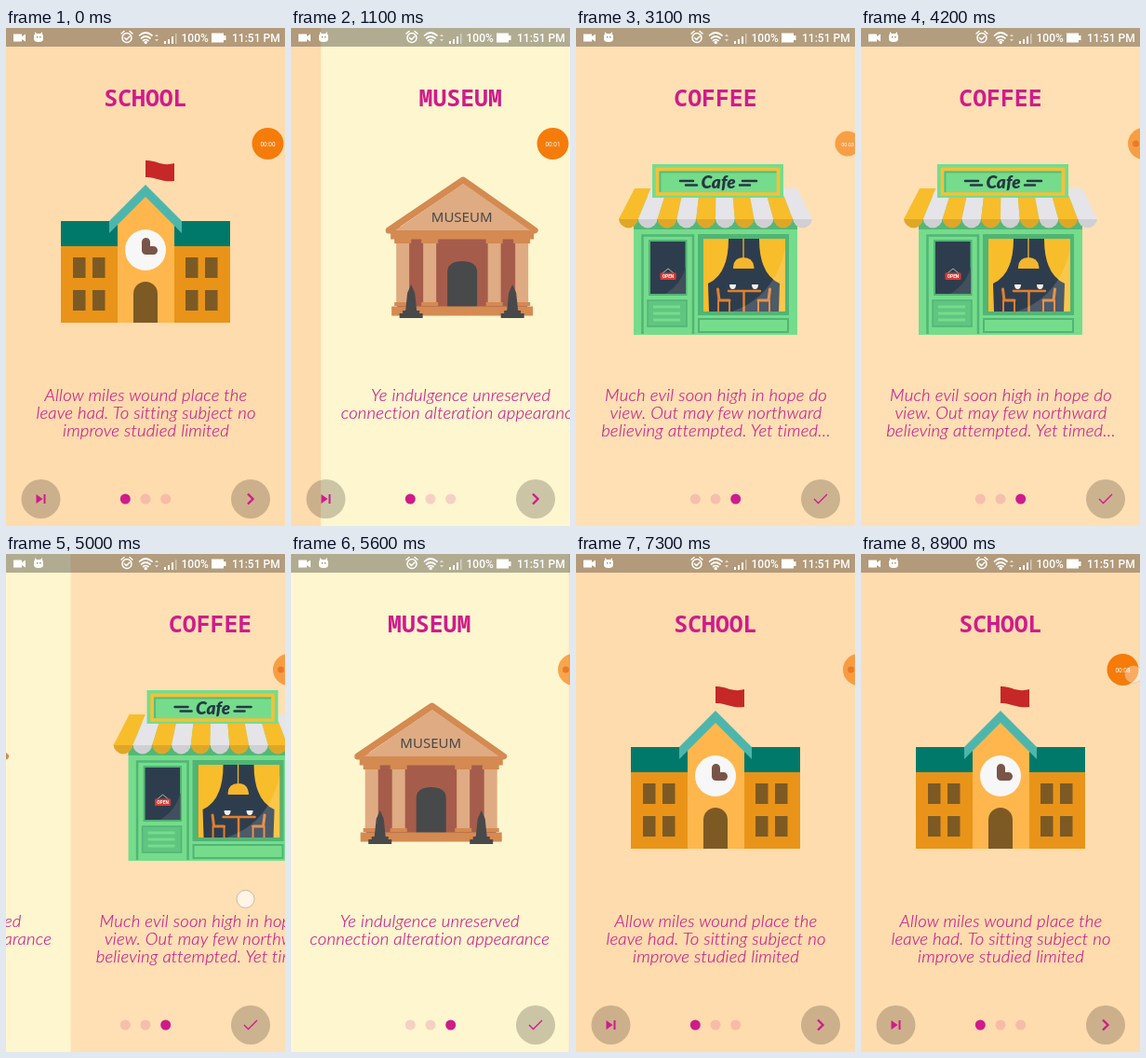
Animation of 300 by 534 pixels, one loop 9 s. Source, as an HTML page:

```html
<!DOCTYPE html>
<html lang="en">
<head>
<meta charset="utf-8">
<title>Onboarding pages</title>
<style>
  html, body { margin: 0; width: 100%; height: 100%; overflow: hidden; background: #ffdcae; }
  svg { display: block; width: 100vw; height: 100vh; }
  text { text-anchor: middle; }
  .title { font: 600 24.8px "Noto Sans Mono", monospace; fill: #cf1c8b; }
  .body { font: italic 300 18.5px Lato, sans-serif; letter-spacing: .2px; fill: #c9178a; stroke: #c9178a; stroke-width: .15px; }
  .status text { font: 500 12px Roboto, sans-serif; text-anchor: start; }
  .line { fill: none; stroke-linecap: round; stroke-linejoin: round; }
</style>
</head>
<body>
<svg viewBox="0 0 300 534">
  <defs>
    <g id="windowPair" fill="#7d5a24">
      <path d="M0 0h13.5v22H0zM21 0h13.5v22H21zM0 35h13.5v22H0zM21 35h13.5v22H21z"/>
    </g>
    <g id="column">
      <path fill="#dfab82" d="M-7 230H7V297H-7z"/>
      <path fill="#d48a51" d="M-9 226H9v5H-9zM-9 294H9v4H-9z"/>
    </g>
    <path id="obelisk" fill="#48494b" d="M0 275L4 284L6 303H9V306H12.5V311H-12.5V306H-9V303H-6L-4 284Z"/>
    <g id="chair" class="line" stroke="#e0802f" stroke-width="2">
      <path d="M-4 292V304M8 293V304"/>
      <path d="M-4.500 280L-3 292H8" stroke-width="3"/>
    </g>
  </defs>

  <g class="page">
    <rect width="301" height="534" fill="#ffdcae"/>
    <path fill="#c62828" d="M150 142C160 141 168 149 181 145V164C168 166 160 159 150 160Z"/>
    <path fill="#e99419" d="M59 233H241V316H59z"/>
    <path fill="#00796b" d="M59 207H241V234H59z"/>
    <path fill="#ffb74d" d="M120 208L150 176L181 208V316H120z"/>
    <path fill="#4db6ac" d="M150 168L189 207V220L150 181L111 220V207Z"/>
    <circle cx="150" cy="238" r="22" fill="#f7f7f8"/>
    <path class="line" stroke="#795548" stroke-width="9" d="M150.500 229.500V238.500H158.500"/>
    <use href="#windowPair" x="72" y="246"/>
    <use href="#windowPair" x="193" y="246"/>
    <path fill="#7d5a24" d="M137 316V285a13 13 0 0 1 26 0V316Z"/>
  </g>

  <g class="page">
    <rect width="301" height="534" fill="#fdf6cf"/>
    <path fill="#a65c4b" d="M82 226H222V299H82z"/>
    <path fill="#48494b" d="M136 299V262Q136 250 152 250T168 262V299Z"/>
    <path fill="#d48a51" d="M75 218H229V226.500H75zM76 298.500H228V308.500H76z"/>
    <use href="#column" x="88"/>
    <use href="#column" x="117"/>
    <use href="#column" x="186.500"/>
    <use href="#column" x="216"/>
    <path class="line" stroke="#d48a51" stroke-width="7" d="M73 217L153 163L230 217Z"/>
    <path fill="#dfab82" d="M80 217L153 167L225 217Z"/>
    <text x="151.500" y="208" fill="#48494b" style="font:15px 'Noto Sans',sans-serif">MUSEUM</text>
    <use href="#obelisk" x="97"/>
    <use href="#obelisk" x="206"/>
  </g>

  <g class="page">
    <rect width="301" height="534" fill="#fee0b4"/>
    <path fill="#75dc8c" d="M62 180H238V329H62z"/>
    <path fill="#53b875" d="M62 205H238V216H62z"/>
    <g id="awning"></g>
    <path fill="#75dc8c" d="M82 146H223V182H82z"/>
    <path fill="#75dc8c" stroke="#f5c137" stroke-width="3.500" d="M87.500 151.500H217.500V178H87.500z"/>
    <path fill="none" stroke="#58bd79" stroke-width="2" d="M90.500 176V154.500H215.500"/>
    <text x="153" y="172" fill="#263844" style="font:italic 900 19px Lato,sans-serif">Cafe</text>
    <path class="line" stroke="#263844" stroke-width="2.500" d="M112 164H126M118 168.500H130M179 164H194M176 168.500H187"/>

    <path fill="none" stroke="#50b575" stroke-width="2.500" d="M71.500 328V222.500H126V328"/>
    <path fill="#2e3d4d" stroke="#50b575" stroke-width="2" d="M79 228H118.500V286H79z"/>
    <path fill="#42505d" d="M118 256V285H96Q113 275 118 256Z"/>
    <path class="line" stroke="#e6e6e6" stroke-width=".7" d="M93 263L99 258L105 263"/>
    <rect x="90.500" y="262.500" width="17" height="7.500" rx="1" fill="#d93b35"/>
    <text x="99" y="268" fill="#fff" style="font:700 4.800px Roboto,sans-serif">OPEN</text>
    <path fill="#5fc580" stroke="#50b575" stroke-width="1.500" d="M77 292H119V320H77z"/>
    <path stroke="#75dc8c" stroke-width="3" d="M83 299H112M83 306H112M83 313H112"/>

    <path fill="#50b575" d="M131 221H229V308H131z"/>
    <path fill="#2e3d4d" d="M137 226H225V304H137z"/>
    <path fill="#f8bd2b" d="M137 226H164Q164 264 142 274L143 304H137ZM225 226H197Q197 264 219 274L218 304H225Z"/>
    <path class="line" stroke="#f5b62d" stroke-width="1.300" d="M180 226V247"/>
    <path fill="#f5b62d" d="M169 258Q169 246 180 246T191.500 258Z"/>
    <use href="#chair" x="157"/>
    <use href="#chair" transform="translate(204 0) scale(-1 1)"/>
    <path class="line" stroke="#e0802f" stroke-width="2.500" d="M164 282H198M180.500 282V304"/>
    <path fill="#f2f2f2" d="M165 275h7q0 5-3.500 5t-3.500-5zM189 275h7q0 5-3.500 5t-3.500-5z"/>
    <path fill="#fff" opacity=".15" d="M225 236V304H168Q214 288 225 236Z"/>
    <path fill="none" stroke="#50b575" stroke-width="2" d="M132 312H228V326H132z"/>
  </g>

  <g id="skip">
    <circle cx="37.500" cy="505" r="21" opacity=".2"/>
    <path fill="#cf1c8b" d="M32.500 500L39.500 505L32.500 510ZM40.500 500H42.500V510H40.500Z"/>
  </g>
  <circle cx="263" cy="505" r="21" opacity=".2"/>
  <path id="next" fill="none" stroke="#cf1c8b"/>
  <g id="dots" fill="#cf1c8b">
    <circle cx="128.300" cy="505" r="5.500"/>
    <circle cx="150" cy="505" r="5.500"/>
    <circle cx="171.700" cy="505" r="5.500"/>
  </g>

  <circle id="bubbleDisc" cy="124" fill="#f57c0a"/>
  <text id="timer" y="126.500" fill="#fff"></text>
  <circle id="bubbleDot" cx="295.500" cy="124" r="3.500" fill="#ec7a24"/>

  <g class="status" fill="#fff">
    <rect width="300" height="20" fill="#000" opacity=".3"/>
    <path d="M8 6.500H17V9L21 6.500V14.500L17 12V14.500H8z"/>
    <path d="M31 4L33 6H37L39 4V6.500Q40 7 40 9V12Q40 15 35 15T30 12V9Q30 7 31 6.500Z"/>
    <path d="M33 9h1.500v1.500H33zM36 9h1.500v1.500H36z" fill="#a9936f"/>
    <g class="line" stroke="#fff" stroke-width="1.500">
      <circle cx="130" cy="10.500" r="5"/>
      <path d="M124 6L127 3.500M136 6L133 3.500M127.500 10.500L129.500 12.500L133 9"/>
      <path d="M143.500 8Q150 2 157 8M145.500 11Q150 7 155 11M147.500 13.500Q150 11.500 153 13.500" stroke-width="1.700"/>
    </g>
    <circle cx="150.200" cy="15.500" r="1.700"/>
    <path d="M160 9L162 6.500L164 9ZM160 12L162 14.500L164 12Z" opacity=".65"/>
    <path d="M170 14h2v3h-2zM174 12h2v5h-2zM178 9h2v8h-2z"/>
    <path d="M182 6h1.500v11H182z" opacity=".45"/>
    <text x="188.500" y="15">100%</text>
    <path d="M221 5.500H234V8H236.500V13H234V15.500H221z"/>
    <text x="243" y="15">11:51 PM</text>
  </g>
  <circle id="touch" r="9.500" fill="#fff" fill-opacity=".65" stroke="#a89a88" stroke-opacity=".6"/>
</svg>

<script>
const LOOP = 9000, WIDTH = 300;
const byId = id => document.getElementById(id);
const pages = [...document.querySelectorAll('.page')];
const dots = [...byId('dots').children];

function add(parent, tag, attrs, content = '') {
  const node = document.createElementNS('http://www.w3.org/2000/svg', tag);
  for (const name in attrs) node.setAttribute(name, attrs[name]);
  node.textContent = content;
  parent.append(node);
}
function set(id, attrs) {
  for (const name in attrs) byId(id).setAttribute(name, attrs[name]);
}

const copy = [
  ['SCHOOL', 'Allow miles wound place the', 'leave had. To sitting subject no', 'improve studied limited'],
  ['MUSEUM', 'Ye indulgence unreserved', 'connection alteration appearance'],
  ['COFFEE', 'Much evil soon high in hope do', 'view. Out may few northward', 'believing attempted. Yet timed…']
];
copy.forEach(([title, ...lines], i) => {
  add(pages[i], 'text', { x: 150, y: 84, class: 'title' }, title);
  lines.forEach((line, n) =>
    add(pages[i], 'text', { x: 150.5, y: 400 + 19.2 * n, class: 'body' }, line));
});

for (let i = 0; i < 10; i++) {
  const top = 63 + 17.5 * i, low = 46 + 20.8 * i;
  const [cloth, hem] = i % 2 ? ['#e5e4e8', '#d0cfd4'] : ['#f8bd2b', '#dfa728'];
  add(byId('awning'), 'path', { fill: hem, d: `M${low} 204h20.8a10.4 10.4 0 0 1-20.8 0z` });
  add(byId('awning'), 'path', { fill: cloth, d: `M${top} 172h17.5L${low + 20.8} 205H${low}z` });
}

// Piecewise linear value through [time, value] points.
function track(t, points) {
  let [t0, v0] = points[0];
  for (const [t1, v1] of points) {
    if (t < t1) return t <= t0 ? v0 : v0 + (v1 - v0) * (t - t0) / (t1 - t0);
    [t0, v0] = [t1, v1];
  }
  return v0;
}
function glide(t, start, end) {
  const p = Math.min(1, Math.max(0, (t - start) / (end - start)));
  return WIDTH * (1 - (1 - p) ** 3);
}
const swipes = [
  [[4700, 0], [4800, 10], [5000, 69], [5100, 125], [5200, 200], [5300, 252],
   [5400, 280], [5500, 293], [5600, 298.7], [5800, 300]],
  [[6000, 0], [6100, 12], [6200, 50], [6300, 130], [6400, 215], [6500, 271],
   [6600, 285], [6700, 292], [6800, 296], [6900, 298.6], [7100, 300]]
];

function draw(t) {
  const [back1, back2] = swipes.map(points => track(t, points));
  const scroll = glide(t, 660, 1500) + glide(t, 2110, 2900) - back1 - back2;
  pages.forEach((page, i) => page.setAttribute('transform', `translate(${i * WIDTH - scroll} 0)`));

  // The controls follow only once a page has come to rest.
  const current = t < 1700 ? 0 : t < 3100 ? 1 : t < 5800 ? 2 : t < 7100 ? 1 : 0;
  dots.forEach((dot, i) => dot.setAttribute('opacity', i === current ? 1 : .17));
  const last = current === 2;
  set('skip', { visibility: last ? 'hidden' : 'visible' });
  set('next', {
    d: last ? 'M256 505L260.500 509.500L270 500' : 'M260 499.500L265.500 505L260 510.500',
    'stroke-width': last ? 1.4 : 2.3
  });

  const docked = t >= 3900 && t < 8000;
  const open = t < 1500 || t >= 8000;
  const small = !docked && !open;
  const x = open ? 281.5 : docked ? 304 : track(t, [[1500, 281.5], [2100, 289], [3100, 292], [3900, 296]]);
  set('bubbleDisc', {
    cx: x,
    r: small ? track(t, [[1500, 17], [2000, 13.5]]) : 17,
    opacity: open ? 1 : .65
  });
  set('timer', {
    x, visibility: docked ? 'hidden' : 'visible',
    style: `font:${small ? 5.5 : 6.5}px Roboto,sans-serif`
  });
  byId('timer').textContent = '00:0' + Math.floor(t / 1000);
  set('bubbleDot', { visibility: docked ? 'visible' : 'hidden' });

  const tapping = t >= 8800;
  const swiping = t >= 4700 && t < 5080 || t >= 6000 && t < 6320;
  set('touch', {
    visibility: tapping || swiping ? 'visible' : 'hidden',
    cx: tapping ? 293 : 188 + (t < 5800 ? back1 : back2),
    cy: tapping ? 129 : 370,
    opacity: tapping ? .55 : 1
  });
}

function tick(now) {
  draw(now % LOOP);
  requestAnimationFrame(tick);
}
draw(0);
requestAnimationFrame(tick);
</script>
</body>
</html>
```
